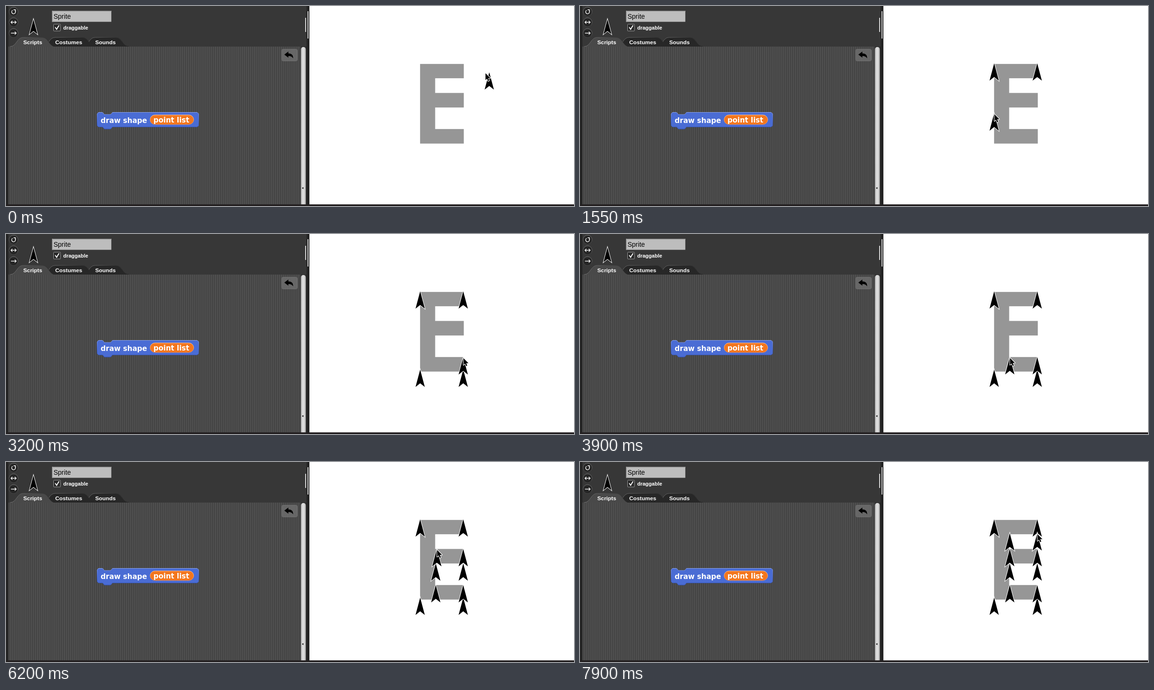
These frames come from a looping animation (1200 px wide and 424 px high, 8 s). An HTML page with a canvas:

```html
<!DOCTYPE html>
<html lang="en">
<head>
<meta charset="utf-8">
<title>Placing the points of a letter</title>
<style>
html, body { margin: 0; width: 100%; height: 100%; overflow: hidden; background: #222; }
canvas { display: block; }
</style>
</head>
<body>
<canvas id="stage" width="1200" height="424"></canvas>
<script>
const LOOP = 8000, STEP = 50;
const LONG_MOVE = 550, SHORT_MOVE = 400;
const LANDINGS = [550, 1250, 1950, 2700, 3300, 3900, 4550, 5250, 5850, 6400, 6900, 7650];

const mix = (a, b, k) => a + (b - a) * k;
const easeOut = u => 1 - Math.pow(1 - u, 3.2);
const easeBack = u => 1 + 2.7 * Math.pow(u - 1, 3) + 1.7 * Math.pow(u - 1, 2);

// Walks round the letter E from its top right; each row holds two corners.
function corners([left, stem, right], rows) {
  return LANDINGS.map((_, i) => {
    const atRight = i % 4 === 0 || i % 4 === 3;
    return [atRight ? right : i < 4 ? left : stem, rows[i >> 1]];
  });
}

const letter = corners([875, 906.5, 967], [123, 291.5, 261, 215, 184.5, 153]);
const tips = corners([875, 908, 966], [121, 287, 260.5, 214.5, 184, 150.5]);
const firstTip = [1021, 140];

const moves = tips.map((tip, i) => {
  const from = tips[i - 1] || firstTip;
  const far = Math.hypot(tip[0] - from[0], tip[1] - from[1]) > 50;
  const time = far ? LONG_MOVE : SHORT_MOVE;
  const ease = tip[0] > from[0] + 10 ? easeBack : easeOut;
  return { from, tip, time, ease, start: LANDINGS[i] - time };
});

const ctx = document.getElementById('stage').getContext('2d');

function rect(c, x, y, w, h, fill) {
  c.fillStyle = fill;
  c.fillRect(x, y, w, h);
}

function paint(c, fill, line, width = 1) {
  c.fillStyle = fill;
  c.fill();
  if (!line) return;
  c.lineWidth = width;
  c.strokeStyle = line;
  c.stroke();
}

function round(c, x, y, w, h, r, fill, line) {
  c.beginPath();
  c.roundRect(x, y, w, h, r);
  paint(c, fill, line);
}

function poly(c, points, x = 0, y = 0, size = 1) {
  c.beginPath();
  points.forEach(([px, py]) => c.lineTo(x + px * size, y + py * size));
  c.closePath();
}

function line(c, points, color, width = 1.4) {
  c.beginPath();
  points.forEach(([x, y]) => c.lineTo(x, y));
  c.strokeStyle = color;
  c.lineWidth = width;
  c.stroke();
}

function text(c, str, x, y, font, color = '#fff') {
  c.font = font;
  c.fillStyle = color;
  c.fillText(str, x, y);
}

function shade(c, x0, y0, x1, y1, ...colors) {
  const g = c.createLinearGradient(x0, y0, x1, y1);
  colors.forEach((color, i) => g.addColorStop(i / (colors.length - 1), color));
  return g;
}

function outlined(c, width) {
  c.lineWidth = width;
  c.strokeStyle = '#fff';
  c.stroke();
  c.fillStyle = '#000';
  c.fill();
}

function arrow(c, x, y, size = 1) {
  poly(c, [[0, 0.5], [-9.8, 37.3], [0, 29.5], [9.8, 37.3]], x, y, size);
  c.lineJoin = 'miter';
  outlined(c, 1.9);
}

function pointer(c, x, y) {
  poly(c, [[0, 0], [0, 14.5], [3.3, 11.4], [5.6, 16.8], [8, 15.8], [5.8, 10.6], [10.4, 10.4]], x, y);
  c.lineJoin = 'round';
  outlined(c, 2.2);
}

function tab(c, label, x, fill) {
  const top = 66.5, foot = 86, slope = 28;
  c.font = 'bold 11.8px "Liberation Sans", Arial, sans-serif';
  const end = x + c.measureText(label).width;
  c.beginPath();
  c.moveTo(x - slope, foot);
  c.bezierCurveTo(x - slope / 2, foot, x - slope / 2, top, x, top);
  c.lineTo(end, top);
  c.bezierCurveTo(end + slope / 2, top, end + slope / 2, foot, end + slope, foot);
  paint(c, fill, shade(c, x - slope, 0, end + slope, 0, '#777', '#484848', '#222'));
  text(c, label, x, 81, c.font);
}

function knob(c, y) {
  c.beginPath();
  c.arc(16, y, 9.5, 0, Math.PI * 2);
  paint(c, '#252525', shade(c, 0, y - 10, 0, y + 10, '#777', '#444'));
}

function head(c, y, dir) {
  const tip = 16 + 5.5 * dir, back = tip - 3 * dir;
  line(c, [[back, y - 3], [tip, y], [back, y + 3]], '#fff');
}

function drawKnobs(c) {
  const [turn, both, right] = [12, 34.5, 57.5];
  [turn, both, right].forEach(y => knob(c, y));
  [both, right].forEach(y => {
    line(c, [[10.5, y], [21.5, y]], '#fff');
    head(c, y, 1);
  });
  head(c, both, -1);
  c.beginPath();
  c.arc(16, turn + 0.5, 4, -0.5, 4.2);
  c.stroke();
  line(c, [[16, turn - 4], [20, turn - 4], [20, turn]], '#fff');
}

function drawHeader(c) {
  rect(c, 0, 0, 641, 424, '#242424');
  rect(c, 5, 0, 630, 86, '#373737');
  drawKnobs(c);
  arrow(c, 58, 28, 0.85);

  rect(c, 97, 10, 125.5, 23.5, '#bdbdbd');
  rect(c, 97, 10, 125.5, 2, shade(c, 0, 10, 0, 12, '#777', '#bdbdbd'));
  rect(c, 97, 10, 2, 23.5, shade(c, 97, 0, 99, 0, '#777', '#bdbdbd'));
  text(c, 'Sprite', 100.5, 27, '14px "Liberation Sans", Arial, sans-serif', '#000');

  round(c, 100.5, 38.5, 14.5, 14.5, 1, '#292929', '#999');
  line(c, [[104, 45], [107, 49.5], [112, 41]], '#fff', 1.9);
  text(c, 'draggable', 121, 50, 'bold 11px "Liberation Sans", Arial, sans-serif');

  tab(c, 'Sounds', 188.5, '#272727');
  tab(c, 'Costumes', 104, '#272727');
  tab(c, 'Scripts', 36.5, '#494949');
}

function drawPane(c) {
  rect(c, 5, 86, 617, 338, '#4f4f4f');
  for (let x = 7; x < 621; x += 4.37) rect(c, x, 86, 1.3, 338, '#3e3e3e');

  round(c, 582.5, 91.5, 33, 25, 3, 'rgba(110,110,110,0.8)', '#707070');
  c.beginPath();
  c.moveTo(588, 103);
  c.lineTo(596.5, 96.5);
  c.lineTo(596.5, 100.5);
  c.quadraticCurveTo(607, 100.5, 606.5, 111);
  c.quadraticCurveTo(603.5, 105.8, 596.5, 106);
  c.lineTo(596.5, 109.5);
  paint(c, '#000');

  rect(c, 622, 86, 12, 338, '#303030');
  round(c, 623, 87, 10.5, 345, 5, shade(c, 623, 0, 634, 0, '#aaa', '#e0e0e0', '#d8d8d8', '#999'));
  poly(c, [[625.2, 386], [628.4, 383.8], [628.4, 388.2]]);
  paint(c, '#111');
  rect(c, 632, 25, 2, 30, '#d0d0d0');
  rect(c, 637, 11, 2, 58, '#d0d0d0');
}

function drawBlock(c) {
  const left = 192.5, right = 407, top = 225.5, bottom = 256.5, cut = 3, dent = 4.5;
  const notch = [[204, 0], [208, dent], [221, dent], [225, 0]];
  poly(c, [
    [left, top + cut], [left + cut, top],
    ...notch.map(([x, y]) => [x, top + y]),
    [right - cut, top], [right, top + cut], [right, bottom - cut], [right - cut, bottom],
    ...notch.reverse().map(([x, y]) => [x, bottom + y]),
    [left + cut, bottom], [left, bottom - cut]
  ]);
  c.lineJoin = 'round';
  paint(c, '#4a6cd4', shade(c, 0, top, 0, bottom + dent, '#8ba2e8', '#6683dc', '#4a6cd4', '#3c58b0', '#304a9c'));

  const font = 'bold 15px "DejaVu Sans", Verdana, sans-serif';
  text(c, 'draw shape', 200, 247.5, font);
  round(c, 304.5, 231, 92, 20, 10, '#f3761d', shade(c, 0, 231, 0, 251, '#ffc49a', '#f08a48'));
  text(c, 'point list', 311.5, 246.5, font);
}

function drawLetter(c) {
  rect(c, 641, 0, 559, 424, '#fff');
  rect(c, 0, 420.5, 1200, 3.5, '#231f20');
  poly(c, letter);
  paint(c, '#969696', 'rgba(150,150,150,0.35)');
}

const scene = document.createElement('canvas');
scene.width = 1200;
scene.height = 424;
const sceneCtx = scene.getContext('2d');
[drawHeader, drawPane, drawBlock, drawLetter].forEach(draw => draw(sceneCtx));

function frame(now) {
  const t = Math.floor((now % LOOP) / STEP) * STEP;
  ctx.drawImage(scene, 0, 0);

  let [x, y] = firstTip;
  for (const { from, tip, time, ease, start } of moves) {
    if (t < start) break;
    const k = ease(Math.min(1, (t - start) / time));
    x = mix(from[0], tip[0], k);
    y = mix(from[1], tip[1], k);
    if (t < start + time) break;
    arrow(ctx, x, y);
  }
  arrow(ctx, x, y);

  // The hand starts beside the tip and settles on it during the first move.
  const grip = easeOut(Math.min(1, t / LONG_MOVE));
  pointer(ctx, x + mix(-8, 0.5, grip), y + 2.5);
  requestAnimationFrame(frame);
}
requestAnimationFrame(frame);
</script>
</body>
</html>
```
